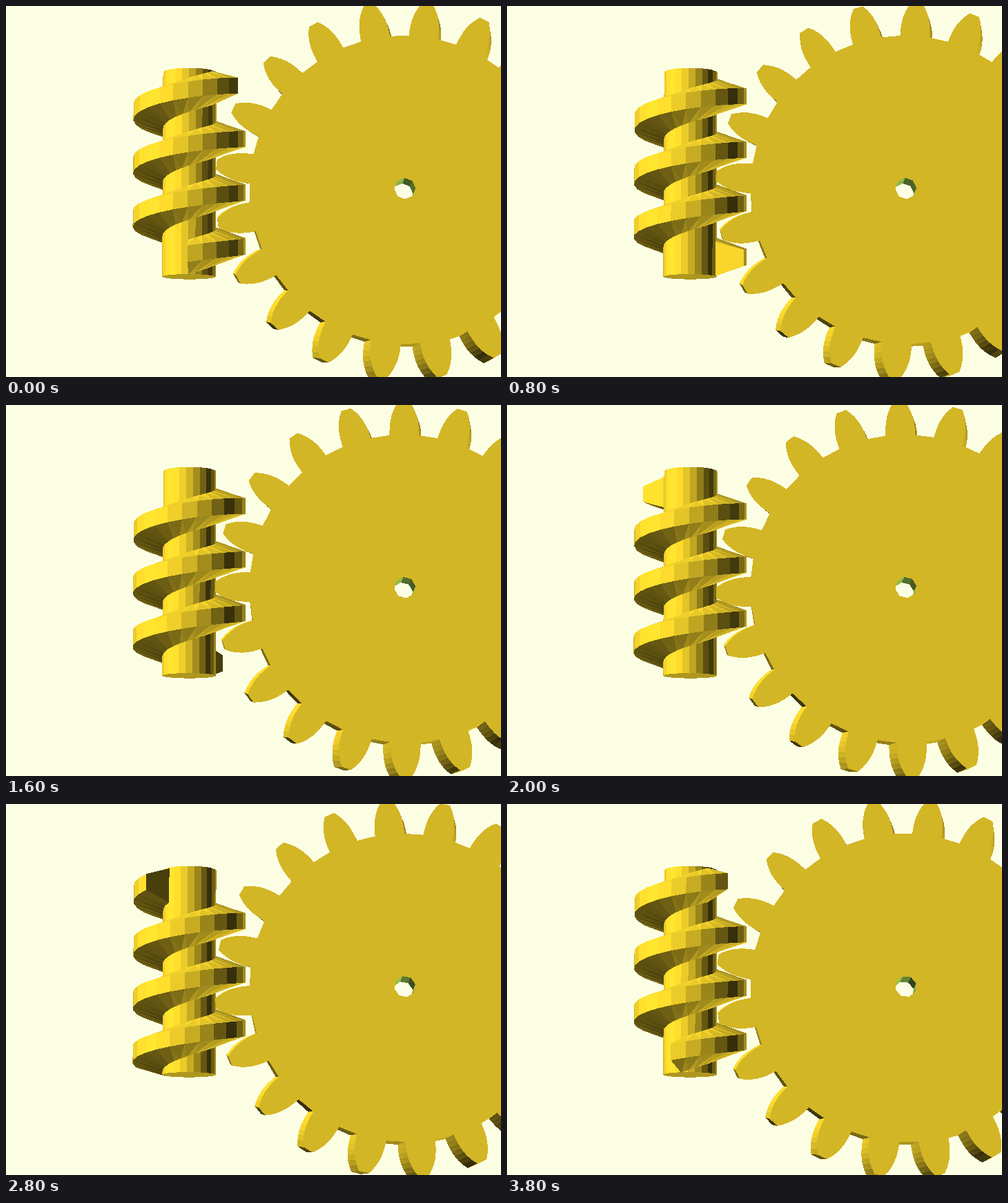
An HTML page with a canvas for the animation above (4 s loop, 717 by 537 pixels).

```html
<!DOCTYPE html>
<html lang="en">
<head>
<meta charset="utf-8">
<title>Worm drive</title>
<style>
html, body { margin: 0; width: 100%; height: 100%; overflow: hidden; background: #fcfee4; }
canvas { display: block; }
</style>
</head>
<body>
<canvas id="stage" width="717" height="537"></canvas>
<script>
const W = 717, H = 537, STEPS = 20, STEP_MS = 200;
const ctx = document.getElementById('stage').getContext('2d');
const TAU = Math.PI * 2, DEG = Math.PI / 180;

// Camera: slightly below the parts, long focal length
const FOCAL = 3600, CX = 358.2, CY = 268.2;
const TILT_S = Math.sin(7.5 * DEG), TILT_C = Math.cos(7.5 * DEG);

const YELLOW = [249, 215, 44], GREEN = [157, 203, 81];
const BACKGROUND = 0xffe4fefc;

// One worm turn has `sides` facets; the thread runs 3 1/6 turns
const WORM = { x: -92.7, y: 25.05, half: 149.25, core: 38.8, inner: 37, outer: 81.7,
               pitch: 78.2, start: -99.5, sides: 24, segments: 76, baseHalf: 25.4, tipHalf: 11.7 };
const GEAR = { x: 217.8, y: 0.1, teeth: 20, root: 223.2, tip: 273, half: 30,
               phase: 7.4, twist: 1.9, hole: 15.4 };

let pixels, depth;

const toEye = ([x, y, z]) => [x, y * TILT_C + z * TILT_S, z * TILT_C - y * TILT_S];

function toScreen([x, y, z]) {
  const s = FOCAL / (FOCAL - z);
  return [CX + x * s, CY - y * s, s];
}

function shade(a, b, c, color) {
  const ux = b[0] - a[0], uy = b[1] - a[1], uz = b[2] - a[2];
  const vx = c[0] - a[0], vy = c[1] - a[1], vz = c[2] - a[2];
  const nx = uy * vz - uz * vy, ny = uz * vx - ux * vz, nz = ux * vy - uy * vx;
  const len = Math.hypot(nx, ny, nz) || 1;
  const light = 0.2 + Math.abs(-nx + ny + nz) / (len * Math.sqrt(3));
  const [r, g, b8] = color.map(v => Math.min(255, Math.round(v * light)));
  return (255 << 24 | b8 << 16 | g << 8 | r) >>> 0;
}

// Flat-shaded triangle with a depth test
function triangle(p, q, r, color) {
  const eye = [p, q, r].map(toEye);
  const ink = shade(...eye, color);
  const v = eye.map(toScreen);
  const [a, b, c] = v;
  const area = (b[0] - a[0]) * (c[1] - a[1]) - (c[0] - a[0]) * (b[1] - a[1]);
  if (Math.abs(area) < 1e-6) return;
  const dx = ((b[2] - a[2]) * (c[1] - a[1]) - (c[2] - a[2]) * (b[1] - a[1])) / area;
  const dy = ((c[2] - a[2]) * (b[0] - a[0]) - (b[2] - a[2]) * (c[0] - a[0])) / area;
  const top = Math.max(0, Math.ceil(Math.min(a[1], b[1], c[1]) - 0.5));
  const bottom = Math.min(H - 1, Math.floor(Math.max(a[1], b[1], c[1]) - 0.5));
  for (let y = top; y <= bottom; y++) {
    const row = y + 0.5;
    let left = Infinity, right = -Infinity;
    for (let i = 0; i < 3; i++) {
      let m = v[i], n = v[(i + 1) % 3];
      if (m[1] > n[1]) [m, n] = [n, m];
      if (row < m[1] || row > n[1] || m[1] === n[1]) continue;
      const x = m[0] + (n[0] - m[0]) * (row - m[1]) / (n[1] - m[1]);
      left = Math.min(left, x);
      right = Math.max(right, x);
    }
    const from = Math.max(0, Math.ceil(left - 0.5));
    const to = Math.min(W, Math.ceil(right - 0.5));
    for (let x = from; x < to; x++) {
      const d = a[2] + (x + 0.5 - a[0]) * dx + (row - a[1]) * dy;
      const i = y * W + x;
      if (d > depth[i]) {
        depth[i] = d;
        pixels[i] = ink;
      }
    }
  }
}

function face(points, color) {
  for (let i = 2; i < points.length; i++) triangle(points[0], points[i - 1], points[i], color);
}

function drawWorm(turn) {
  // Angle 0 faces the viewer and grows to the right
  const at = (angle, r, y) => [WORM.x + r * Math.sin(angle), y, r * Math.cos(angle)];
  const angleOf = i => turn * TAU + i * TAU / WORM.sides;
  const low = WORM.y - WORM.half, high = WORM.y + WORM.half;
  const rim = y => Array.from({ length: WORM.sides }, (_, i) => at(angleOf(i), WORM.core, y));
  const bottom = rim(low), top = rim(high);
  face(bottom, YELLOW);
  face(top, YELLOW);
  bottom.forEach((p, i) => {
    const j = (i + 1) % WORM.sides;
    face([p, bottom[j], top[j], top[i]], YELLOW);
  });

  const section = i => {
    const angle = angleOf(i);
    const y = WORM.start + WORM.pitch * i / WORM.sides;
    return [
      at(angle, WORM.inner, y - WORM.baseHalf),
      at(angle, WORM.outer, y - WORM.tipHalf),
      at(angle, WORM.outer, y + WORM.tipHalf),
      at(angle, WORM.inner, y + WORM.baseHalf)
    ];
  };
  face(section(0), YELLOW);
  face(section(WORM.segments), YELLOW);
  for (let i = 0; i < WORM.segments; i++) {
    const m = section(i), n = section(i + 1);
    for (let k = 0; k < 3; k++) face([m[k], m[k + 1], n[k + 1], n[k]], YELLOW);
  }
}

// Outline as [angle, radius], angles measured upward from the left
function gearOutline() {
  const points = [], rows = 7;
  const flank = (centre, side, k) => {
    const u = k / rows;
    const r = GEAR.root + (GEAR.tip - GEAR.root) * u;
    const halfWidth = 21.4 - 14.1 * u ** 2.7;
    points.push([centre + side * halfWidth / r, r]);
  };
  for (let i = 0; i < GEAR.teeth; i++) {
    const centre = i * TAU / GEAR.teeth;
    for (let k = 0; k <= rows; k++) flank(centre, -1, k);
    for (let k = rows; k >= 0; k--) flank(centre, 1, k);
  }
  return points;
}

const outline = gearOutline();

function drawGear(turn) {
  const at = (a, r, z) => [GEAR.x - r * Math.cos(a), GEAR.y + r * Math.sin(a), z];
  const spin = -turn * TAU / GEAR.teeth;
  const base = spin + GEAR.phase * DEG, twist = GEAR.twist * DEG;
  const eighth = TAU / 8;
  const holeRadius = a => {
    const rest = (((a - spin) % eighth) + eighth) % eighth;
    return GEAR.hole * Math.cos(eighth / 2) / Math.cos(rest - eighth / 2);
  };
  const front = outline.map(([a, r]) => at(a + base, r, GEAR.half));
  const back = outline.map(([a, r]) => at(a + base + twist, r, -GEAR.half));
  const inner = outline.map(([a]) => at(a + base, holeRadius(a + base), GEAR.half));
  front.forEach((p, i) => {
    const j = (i + 1) % front.length;
    face([inner[i], p, front[j], inner[j]], YELLOW);
    face([p, front[j], back[j], back[i]], YELLOW);
  });
  for (let i = 0; i < 8; i++) {
    const a = spin + i * eighth, b = a + eighth;
    face([at(a, GEAR.hole, GEAR.half), at(b, GEAR.hole, GEAR.half),
          at(b, GEAR.hole, -GEAR.half), at(a, GEAR.hole, -GEAR.half)], GREEN);
  }
}

function render(step) {
  const image = ctx.createImageData(W, H);
  pixels = new Uint32Array(image.data.buffer).fill(BACKGROUND);
  depth = new Float64Array(W * H);
  drawWorm(step / STEPS);
  drawGear(step / STEPS);
  return image;
}

const poses = [];
let shown = -1;

function tick() {
  const step = Math.floor(performance.now() / STEP_MS) % STEPS;
  if (step !== shown) {
    poses[step] = poses[step] || render(step);
    ctx.putImageData(poses[step], 0, 0);
    shown = step;
  }
  requestAnimationFrame(tick);
}
tick();
</script>
</body>
</html>
```
